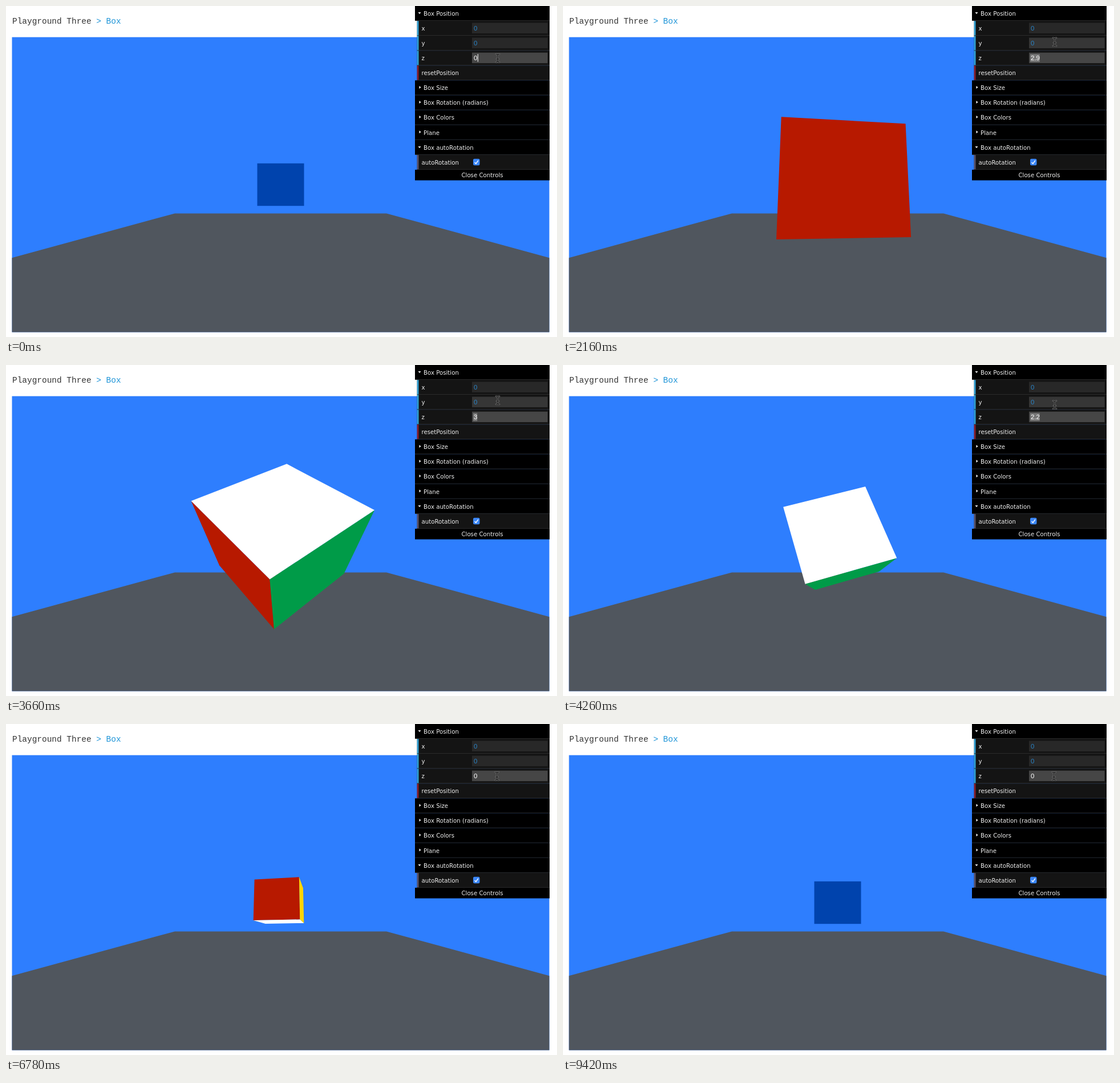
These frames come from a looping animation (966x580 px, 9.48 s). An HTML page:

```html
<!DOCTYPE html>
<html lang="en">
<head>
<meta charset="utf-8">
<title>Playground Three</title>
<style>
  html, body { margin: 0; width: 100%; height: 100%; overflow: hidden; background: #fff; }
  svg { display: block; width: 966px; height: 580px; }
  text { white-space: pre; }
  .title { font: 14.45px "Liberation Mono", monospace; fill: #333; }
  .panel text { font: 10.2px "DejaVu Sans", sans-serif; fill: #eee; }
  .panel text.value { font: 11.5px "Liberation Sans", sans-serif; fill: #2a82c4; }
  .panel text.active { fill: #fff; }
  #ibeam { fill: none; stroke-linecap: round; }
</style>
</head>
<body>
<svg id="stage" viewBox="0 0 966 580">
  <text class="title" x="11" y="31">Playground Three <tspan fill="#2196d8">&gt; Box</tspan></text>
  <rect x="10.5" y="54.6" width="942" height="516.9" fill="#2e7efe"/>
  <path d="M10.5 441.2L296 363.4H667L952.5 441.2V571.5H10.5Z" fill="#50565e"/>
  <g id="cube"></g>
  <g id="panel" class="panel"></g>
  <g id="ibeam"></g>
  <path id="arrow" d="M0 0V14L3.3 11L5.5 16.2L8 15.2L5.8 10.2H10Z" fill="#000" stroke="#fff" stroke-width="1"/>
</svg>
<script>
const LOOP = 9480, STEP = 60, TURN_STEPS = 157;
const CENTER = { x: 481.5, y: 313 }, FOCAL = { x: 369, y: 336 }, CAMERA_Z = 5;

const byId = id => document.getElementById(id);
const panel = byId('panel');

function add(parent, tag, attrs, text) {
  const el = document.createElementNS('http://www.w3.org/2000/svg', tag);
  set(el, attrs);
  if (text !== undefined) el.textContent = text;
  parent.appendChild(el);
  return el;
}
function set(el, attrs) {
  for (const name in attrs) el.setAttribute(name, attrs[name]);
}
const show = (el, on) => el.setAttribute('visibility', on ? 'visible' : 'hidden');

// Control panel: folder rows are full width, control rows are indented
const rowY = i => 12.9 + 26.1 * i;

function row(i, left, fill) {
  const y = rowY(i);
  add(panel, 'rect', { x: left, y: y - 13.1, width: 953 - left, height: 26.1, fill });
  add(panel, 'rect', { x: left, y: y + 12, width: 953 - left, height: 1, fill: '#2c2c2c' });
  return y;
}
function folder(i, label, open) {
  const y = row(i, 717, '#000');
  add(panel, 'path', {
    d: open ? `M722.5 ${y - 1.8}h5l-2.5 3z` : `M724.5 ${y - 3.5}v5l3 -2.5z`, fill: '#fff'
  });
  add(panel, 'text', { x: 732, y: y + 3.8 }, label);
}
function control(i, label, color) {
  const y = row(i, 720.7, '#141414');
  add(panel, 'rect', { x: 720.7, y: y - 12.8, width: 2.8, height: 25.2, fill: color });
  add(panel, 'text', { x: 728.5, y: y + 3.8 }, label);
}
function numberField(i, label) {
  const y = rowY(i);
  control(i, label, '#2fa1d6');
  const box = add(panel, 'rect', { x: 817, y: y - 9.5, width: 132.5, height: 18.5, fill: '#282828' });
  const mark = add(panel, 'rect', { x: 819, y: y - 7, width: 8, height: 14, fill: '#777', visibility: 'hidden' });
  const value = add(panel, 'text', { class: 'value', x: 820, y: y + 4.2 }, '0');
  return { y, box, mark, value };
}

folder(0, 'Box Position', true);
const fields = ['x', 'y', 'z'].map((name, i) => numberField(i + 1, name));
const zField = fields[2];
set(zField.box, { fill: '#464646' });
zField.value.classList.add('active');
const caret = add(panel, 'rect', { y: zField.y - 7, width: 1, height: 13.5, fill: '#fff' });
control(4, 'resetPosition', '#8c1c2a');
['Box Size', 'Box Rotation (radians)', 'Box Colors', 'Plane'].forEach((name, i) => folder(5 + i, name, false));
folder(9, 'Box autoRotation', true);
control(10, 'autoRotation', '#5c5368');
add(panel, 'rect', { x: 819, y: 267.8, width: 11.5, height: 11.5, rx: 2.3, fill: '#3b86f7' });
add(panel, 'path', { d: 'M821.7 273.9l2.2 2.5 4 -5.8', fill: 'none', stroke: '#fff', 'stroke-width': 1.5 });
add(panel, 'rect', { x: 717, y: 286.9, width: 236, height: 18.6 });
add(panel, 'text', { x: 835, y: 299.5, 'text-anchor': 'middle' }, 'Close Controls');

// Text cursor: light halo under a dark stroke
for (const [stroke, width] of [['#777', 2.6], ['#1c1c1c', 1.2]]) {
  add(byId('ibeam'), 'path', {
    d: 'M-3 -7Q0 -7 0 -5Q0 -7 3 -7M0 -5V5M-3 7Q0 7 0 5Q0 7 3 7M-2 1.5H2', stroke, 'stroke-width': width
  });
}

// Each face: axis index, side, colour
const faces = [
  [0, 1, '#b71900'], [0, -1, '#ff5900'],
  [1, 1, '#ffd500'], [1, -1, '#009b48'],
  [2, 1, '#0043ad'], [2, -1, '#ffffff']
].map(([axis, side, fill]) => ({ axis, side, el: add(byId('cube'), 'polygon', { fill }) }));

function drawCube(angle, z) {
  const c = Math.cos(angle), s = Math.sin(angle), depth = CAMERA_Z - z;
  // Equal turns about x and z: the images of the three unit axes
  const axes = [[c, c * s, s * s], [-s, c * c, s * c], [0, -s, c]];
  const project = signs => {
    const [px, py, pz] = [0, 1, 2].map(k =>
      axes.reduce((sum, axis, n) => sum + axis[k] * signs[n] / 2, 0));
    const d = depth - pz;
    return `${(CENTER.x + FOCAL.x * px / d).toFixed(2)},${(CENTER.y - FOCAL.y * py / d).toFixed(2)}`;
  };
  for (const { axis, side, el } of faces) {
    const visible = side * axes[axis][2] * depth > 0.5;
    show(el, visible);
    if (!visible) continue;
    const corners = [[1, 1], [1, -1], [-1, -1], [-1, 1]].map(([u, v]) => {
      const signs = [];
      signs[axis] = side;
      signs[(axis + 1) % 3] = u;
      signs[(axis + 2) % 3] = v;
      return project(signs);
    });
    set(el, { points: corners.join(' ') });
  }
}

// Piecewise linear value through [time, value] points
function track(points, t) {
  const i = points.findIndex(p => p[0] > t);
  if (i < 0) return points[points.length - 1][1];
  if (i === 0) return points[0][1];
  const [t0, a] = points[i - 1], [t1, b] = points[i];
  return a + (b - a) * (t - t0) / (t1 - t0);
}
const dragZ = [[300, 0], [1260, 1.2], [1860, 2.1], [2340, 3.3], [2580, 3.2], [2820, 3],
  [3840, 3], [4260, 2.2], [5700, 0.3], [6000, 0]];
const mouseX = [[4260, 862], [5700, 860.7]];

function drawPanel(t, z) {
  const x = track(mouseX, t), y = 91.3 - 9.8 * z;
  const over = fields.find(f => Math.abs(f.y - y) < 9);
  for (const f of fields.slice(0, 2)) set(f.box, { fill: f === over ? '#363636' : '#282828' });
  show(byId('ibeam'), over);
  show(byId('arrow'), !over);
  for (const id of ['ibeam', 'arrow']) set(byId(id), { transform: `translate(${x} ${y})` });

  const label = String(z);
  const width = label.length > 1 ? 16 : 6.4;
  const selected = z > 0.8;
  zField.value.textContent = label;
  set(zField.mark, { width: width + 0.8 });
  show(zField.mark, selected);
  set(caret, { x: 820.4 + width });
  show(caret, !selected && (z > 0 || (t + 140) % 1000 < 500));
}

function frame(now) {
  const tick = Math.floor(now % LOOP / STEP), t = tick * STEP;
  const z = Math.round(track(dragZ, t) * 10) / 10;
  drawCube(2 * Math.PI * tick / TURN_STEPS, z);
  drawPanel(t, z);
  requestAnimationFrame(() => frame(performance.now() - start));
}
const start = performance.now();
frame(0);
</script>
</body>
</html>
```
